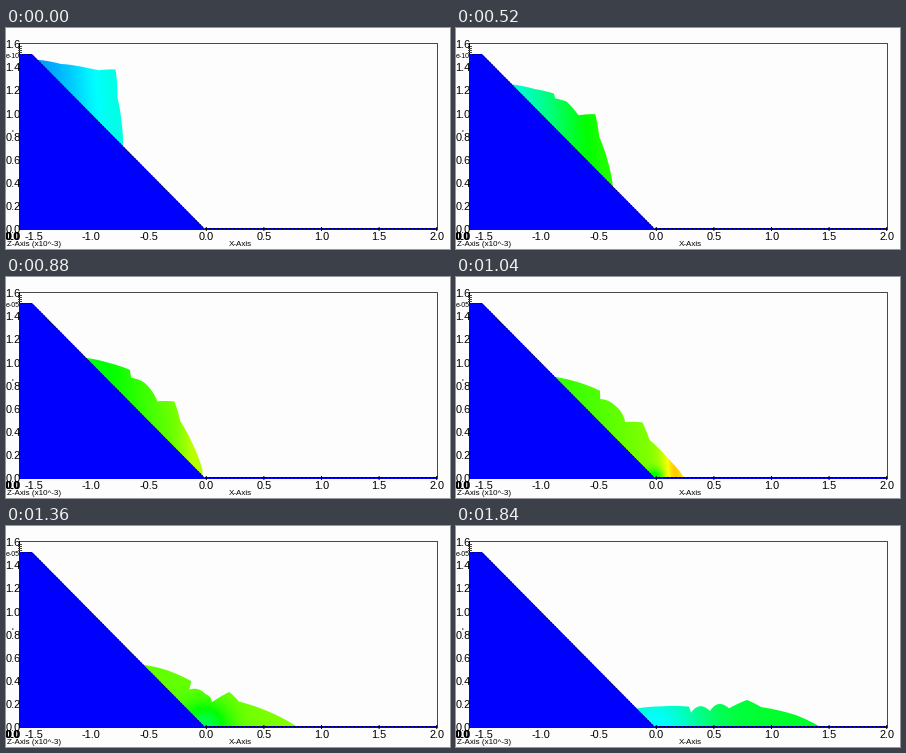
Animation of 444 by 221 pixels, one loop 1920 ms. Source, as a matplotlib script:

```python
import numpy as np
import matplotlib.pyplot as plt
from matplotlib.animation import FuncAnimation
from matplotlib.colors import hsv_to_rgb
from matplotlib.patches import Polygon
from matplotlib.path import Path

W, H, DPI = 444, 221, 100
SLOTS, STEP = 48, 40
HOLDS = np.array([3, 11, 20, 27, 37, 47])  # slots that repeat the last pose
LAST = 41
FOOT = np.array([199, 201])
BLUE, INK, GREY, PAPER = "#0000fe", "#000000", "#484848", "#fdfdfd"

# Surface landmarks from back to toe:
# start x, end x, start height, end height, landing kick, settling power
MARKS = np.array([
    (32, 182, 0, -1, 1, 1),         # back
    (55, 205, 19, 16, 1, 1),
    (72, 233, 34, 19, 1, .3),       # crack top
    (73, 235, 35, 13, .7, 1),       # crack bottom
    (83, 254, 43, 15, .7, .7),
    (93, 273, 51, 18, 0, 2),        # notch
    (109.5, 291, 68.5, 26.5, 0, 1.4),  # peak
    (111.5, 305, 42, 19.5, 0, 1.2),
    (115.5, 340, 22, 11.5, .5, 1.2),
    (117, 364, 0, 0, 1, 1),         # toe
]).T


def bed(x):
    """Slope and floor, rounded where they meet."""
    slope = 26 + (x - 26) * 175 / 173
    return (slope + FOOT[1] - np.hypot(slope - FOOT[1], 14)) / 2


def landmarks(s):
    x0, x1, h0, h1, kick, power = MARKS
    wave = np.sin(np.pi * s * np.arange(1, 4))
    ease = s - (.14 - .03 * kick) * wave[0] - kick * (.04 * wave[1] - .025 * wave[2])
    x = x0 + (x1 - x0) * ease
    h = h0 + (h1 - h0) * (1 - (1 - s) ** power)
    return np.column_stack([x, bed(x) - h])


def outline(pts, s):
    bulge = np.full(len(pts) - 1, .02)
    bulge[2] = 0
    bulge[3:5] = .3 * s * s  # lumps left between the cracks
    t = np.linspace(0, 1, 12)[:, None]
    parts = []
    for p, q, b in zip(pts, pts[1:], bulge):
        d = q - p
        parts.append(p + d * t + 4 * b * t * (1 - t) * np.array([d[1], -d[0]]))
    base = [(pts[-1, 0], FOOT[1]), (60, FOOT[1])]
    return Path(np.vstack(parts + [base]))


def shade(pts, k):
    """Speed as hue: warms on the slope, cools around the foot."""
    back, toe = pts[0], pts[-1]
    lean = .1 * (YY - (back[1] + toe[1]) / 2)
    u = np.clip((XX - lean - back[0]) / (toe[0] - back[0]), 0, 1)
    rear = 150 + 53 * np.cos(np.pi * k / 29)
    front = 85 + .154 * (k - 24) ** 2
    hue = rear + (front - rear) * u * u * (3 - 2 * u)
    reach = max(2.2 * (k - 19), .1)
    hue += 45 * np.exp(-((XX - FOOT[0]) ** 2 + (YY - FOOT[1]) ** 2) / reach ** 2)
    impact = np.exp(-((k - 23) / 4) ** 2)
    hue -= 38 * impact * np.exp(-((XX - toe[0] + 8) / 13) ** 2)
    one = np.ones_like(hue)
    return hsv_to_rgb(np.dstack([hue / 360, one, one]))


def label(x, y, s, px, ha="center", **kw):
    return ax.text(x, y, s, fontsize=px * 72 / DPI, ha=ha, va="center_baseline",
                   color=INK, family="Liberation Sans", zorder=6, **kw)


def line(xs, ys, color=INK, z=4, **kw):
    ax.plot(xs, ys, color=color, lw=72 / DPI, zorder=z, snap=False,
            solid_capstyle="butt", dash_capstyle="butt", **kw)


fig = plt.figure(figsize=(W / 100, H / 100), dpi=DPI, facecolor=PAPER)
ax = fig.add_axes([0, 0, 1, 1])
YY, XX = np.mgrid[0:H, 0:W] + .5
mass = ax.imshow(np.ones((H, W, 3)), extent=(0, W, H, 0), aspect="auto",
                 interpolation="nearest", zorder=1)
ax.set(xlim=(0, W), ylim=(H, 0))
ax.axis("off")

# Slope, floor and plot frame
ax.add_patch(Polygon([(13, 26), (26, 26), FOOT, (13, 202)],
                     fc=BLUE, ec="none", zorder=2, snap=False))
line([13, 26, 199], [26.5, 26.5, 201.5], "#000050", 3, ls=(0, (1, 2)))
line([13, 431], [201.5, 201.5], BLUE, 3)
line([199, 431], [200.5, 200.5], BLUE, 3)
line([199, 431], [200.5, 200.5], INK, ls=(0, (2, 2)))
line([13, 431.5, 431.5], [15.5, 15.5, 202], GREY)
line([13.5, 13.5], [15, 26])
for y in np.arange(18.5, 26, 2):
    line([12, 16], [y, y], GREY)

# Axis labels
for i in range(8):
    x = 27.5 + 57.6 * i
    label(x, 208, f"{-1.5 + .5 * i:.1f}", 11)
    if i > 2:
        line([x, x], [199, 203])
for i in range(9):
    label(14.5, 201 - 23.1 * i, f"{.2 * i:.1f}", 11, ha="right")
for x in (6, 7):
    label(x, 208, "0.0", 11, weight="bold")
label(6, 104, "'", 9)
label(1, 215, "Z-Axis (x10^-3)", 8, ha="left")
label(234, 215, "X-Axis", 8)
exponent = label(0, 27, "", 7, ha="left")


def draw(slot):
    k = slot - np.count_nonzero(HOLDS <= slot)
    s = k / LAST
    pts = landmarks(s)
    mass.set_data(shade(pts, k))
    mass.set_clip_path(outline(pts, s), ax.transData)
    exponent.set_text("e-10" if k < 14 else "e-05")
    return mass, exponent


anim = FuncAnimation(fig, draw, frames=SLOTS, interval=STEP,
                     repeat=True, repeat_delay=0, blit=False)
plt.show()
```
